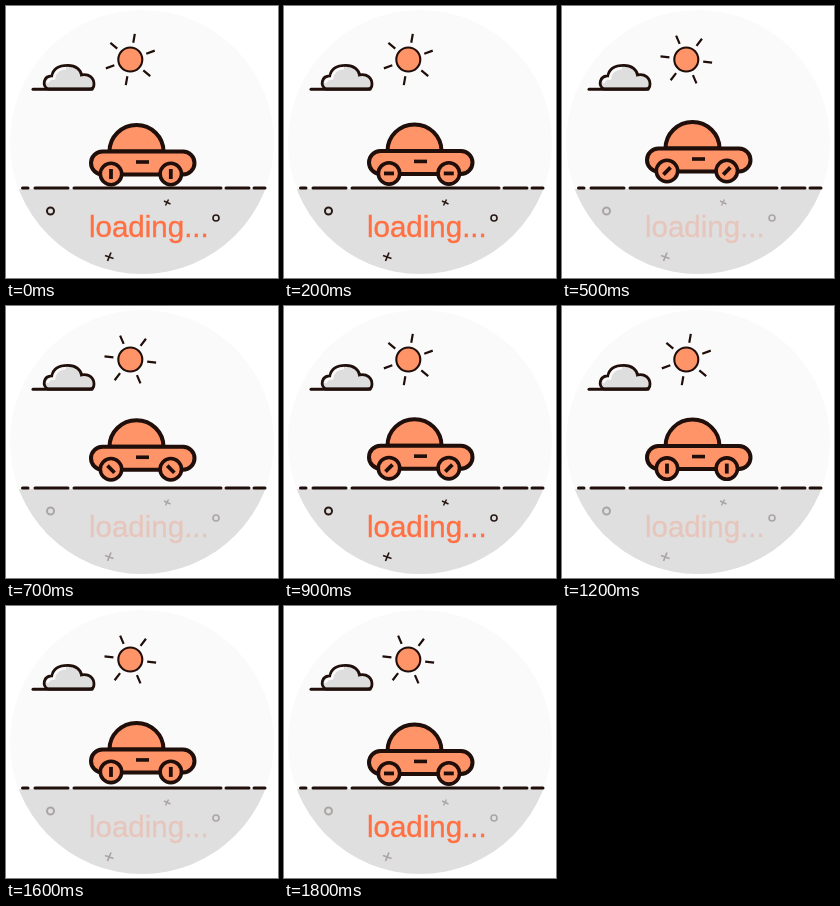
Write an HTML page that moves like this. It is 272 by 272 pixels and loops after 1900 ms.

```html
<!DOCTYPE html>
<html lang="en">
<head>
<meta charset="utf-8">
<title>Loading</title>
<style>
  html, body { margin: 0; width: 100%; height: 100%; overflow: hidden; background: #fff; }
  svg { display: block; width: 100vw; height: 100vh; }
  text { font-family: "Liberation Sans", Arial, sans-serif; font-size: 29.5px; }
</style>
</head>
<body>
<svg viewBox="0 0 272 272" fill="none" stroke="#1f0e09">
  <defs>
    <clipPath id="disc"><circle cx="136" cy="136" r="132"/></clipPath>
    <g id="wheel">
      <circle r="10.7" fill="#ff9468" stroke-width="3.6"/>
    </g>
  </defs>
  <g clip-path="url(#disc)" stroke="none">
    <rect width="272" height="272" fill="#fafafa"/>
    <rect y="183" width="272" height="89" fill="#dfdfdf"/>
  </g>

  <path d="M42 83C36 80 37 70 46 70C47 62 54 59.3 62 59.3C70 59.3 75 64 75.500 69C83 67.500 88 72 88 78Q88 83 84 83Z" fill="#dedede" stroke-width="2.8"/>
  <path d="M41.500 77Q42 72.500 48 72.500Q49 63 60 62" stroke="#fafafa" stroke-width="2.500"/>
  <path d="M27 83.300H86" stroke-width="3" stroke-linecap="round"/>

  <circle cx="124.300" cy="53.500" r="12" fill="#ff9468" stroke-width="2.100"/>
  <path id="rays" stroke-width="2.200"/>

  <path d="M16.500 182H22M29 182H62M68 182H215M220 182H243M248 182H259" stroke-width="3" stroke-linecap="round"/>

  <g id="car">
    <path d="M103.500 139.500a27 26.500 0 0 1 54 0z" fill="#ff9468" stroke-width="4"/>
    <rect x="85" y="139.500" width="103.500" height="23" rx="11.500" fill="#ff9468" stroke-width="4"/>
    <path d="M130 150H143" stroke-width="3.600"/>
    <g transform="translate(105 162)"><use href="#wheel"/><path class="slot" d="M0-5V5" stroke-width="3.800"/></g>
    <g transform="translate(164.800 162)"><use href="#wheel"/><path class="slot" d="M0-5V5" stroke-width="3.800"/></g>
  </g>

  <g id="marks">
    <circle cx="44.500" cy="205" r="3.500" stroke-width="2"/>
    <circle cx="210" cy="212" r="3" stroke-width="1.600"/>
    <path d="M158 195L164.500 198M162.500 193.500L159.500 199.500" stroke-width="1.500"/>
    <path d="M99 249.500L107.500 252.500M105 246.500L101.500 255" stroke-width="1.700"/>
  </g>
  <text id="label" x="83" y="231" fill="#ff7043" stroke="#ff7043" stroke-width=".4">loading...</text>
</svg>
<script>
  const LOOP = 1900, STEP = 100;
  const get = id => document.getElementById(id);
  const rays = get("rays"), car = get("car"), marks = get("marks"), label = get("label");
  const slots = document.querySelectorAll(".slot");

  // True during the first `on` ms of each period
  const blink = (t, shift, period, on) => (t + shift) % period < on;

  let spokes = "";
  for (let a = 0; a < 360; a += 60) {
    const x = Math.cos(a * Math.PI / 180), y = Math.sin(a * Math.PI / 180);
    spokes += `M${17 * x} ${17 * y}L${26 * x} ${26 * y}`;
  }
  rays.setAttribute("d", spokes);

  function draw(now) {
    const t = Math.floor(now % LOOP / STEP) * STEP;
    const lift = 3 * (1 + Math.cos(t * Math.PI / 1000));
    car.setAttribute("transform", `translate(0 ${lift.toFixed(2)})`);
    slots.forEach(s => s.setAttribute("transform", `rotate(${t * 0.45})`));
    const tilt = blink(t, 50, 950, 475) ? 40 : 7;
    rays.setAttribute("transform", `translate(124.3 53.5) rotate(${tilt})`);
    marks.setAttribute("opacity", blink(t, 50, 950, 300) ? 0.95 : 0.27);
    label.setAttribute("opacity", blink(t, 100, 900, 400) ? 1 : 0.22);
  }

  let start;
  function tick(now) {
    start ??= now;
    draw(now - start);
    requestAnimationFrame(tick);
  }
  draw(0);
  requestAnimationFrame(tick);
</script>
</body>
</html>
```
